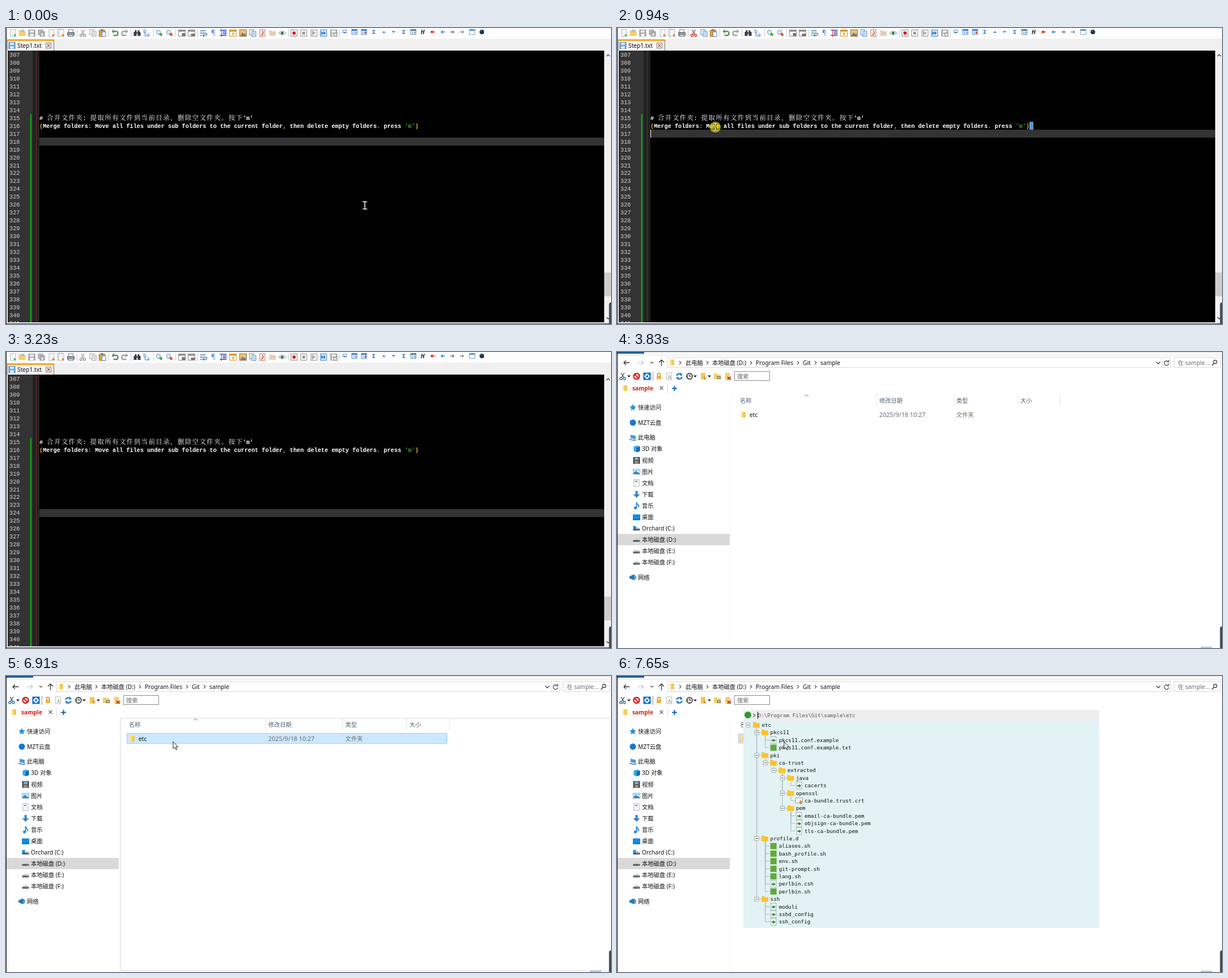
These frames come from a looping animation (1068 px wide and 524 px high, 8 s). An HTML page:

```html
<!DOCTYPE html>
<html lang="zh-CN">
<head>
<meta charset="utf-8">
<style>
html, body { margin: 0; width: 100%; height: 100%; overflow: hidden; background: #fff; }
svg { display: block; width: 100vw; height: 100vh; }
text { white-space: pre; }
.ui { font-family: "Noto Sans", "Noto Sans CJK SC", "Noto Sans CJK", sans-serif; }
.code { font-family: "Liberation Mono", "Noto Sans CJK SC", "Noto Sans CJK", monospace; }
.mono { font-family: "DejaVu Sans Mono", monospace; }
.han { font-family: "Noto Serif CJK SC", "Noto Sans CJK SC", "Noto Sans CJK", serif; letter-spacing: 1.36px; }
</style>
</head>
<body>
<svg id="stage" viewBox="0 0 1068 524" preserveAspectRatio="none"></svg>
<script>
const LOOP = 8000, CW = 6.14, LEFT = 59, END315 = 442, END316 = 728;

// Markup helpers
const R = (x, y, w, h, fill, stroke = 'none') =>
  `<rect x="${x}" y="${y}" width="${w}" height="${h}" fill="${fill}" stroke="${stroke}"/>`;
const P = (d, stroke, w = 1, fill = 'none') =>
  `<path d="${d}" fill="${fill}" stroke="${stroke}" stroke-width="${w}"/>`;
const F = (d, fill) => P(d, 'none', 0, fill);
const C = (x, y, r, fill, stroke = 'none', w = 1) =>
  `<circle cx="${x}" cy="${y}" r="${r}" fill="${fill}" stroke="${stroke}" stroke-width="${w}"/>`;
const T = (x, mid, s, fill = '#111', size = 10.25, cls = 'ui', more = '') =>
  `<text class="${cls}" x="${x}" y="${mid + size * .36}" font-size="${size}" fill="${fill}" ${more}>${s}</text>`;
const G = (id, body, more = '') => `<g id="${id}" ${more}>${body}</g>`;
const at = (x, y, body) => `<g transform="translate(${x} ${y})">${body}</g>`;
const lineMid = n => 201.3 + (n - 318) * 13.95;
const lineTop = n => Math.round(lineMid(n) - 7.2);

// Icons, drawn around 0,0
const page = (c = '#a9b2ba') => R(-4.5, -6, 9, 12, '#fff', c) + P('M-2.5 -2H2.5M-2.5 .5H2.5M-2.5 3H1', '#d3d9de', .8);
const badge = c => C(3.2, 4, 2.4, c, '#fff', .7);
const floppy = (c, hi = '#eee', edge = '#8c8c8c') => R(-5.5, -5.5, 11, 11, c, edge) + R(-3.5, -5, 7, 4, hi) + R(-3, 1.5, 6, 4, '#fff');
const folder = (c = '#f6cf62') => F('M-6 -5H-1L0 -3.5H6V5H-6Z', c);
const scissors = (c, d) => P('M-3 -6L2 2M3 -6L-2 2', c, 1.3) + C(-3, 4, 2, 'none', d, 1.4) + C(3, 4, 2, 'none', d, 1.4);
const copy = c => at(-2, -1.5, R(-3.5, -4.5, 7, 9, '#fff', c)) + at(2, 1.5, R(-3.5, -4.5, 7, 9, '#fff', c) + P('M-2 -2H2M-2 0H2M-2 2H2', c, .7));
const win = c => R(-6, -5.5, 12, 11, '#fff', c) + R(-6, -5.5, 12, 3, c);
const list = (c, d) => win(c) + P('M-4 0H0M-4 3H0', c) + R(1, -1, 4, 5, d);
const lens = c => C(-1.5, -1.5, 3.6, '#d6ebf8', '#7ba3bd', 1.1) + P('M1 1L5 5', '#b58a4a', 1.8) + C(2.8, 2.2, 2.5, c);
const pad = c => R(-5.5, -5.5, 11, 11, '#fbfbfb', '#8b8b8b') + c;
const arrow = (c, s) => `<g transform="scale(${s} 1)">${F('M5 -1H0V-4L-5 0L0 4V1H5Z', c)}</g>`;
const tri = (c, s) => F(`M-4 ${2 * s}H4L0 ${-2 * s}Z`, c);
const tris = c => F('M-4 -4H4L0 0L4 4H-4L0 0Z', c);
const turn = (c, s) => `<g transform="scale(${s} 1)">${P('M-5 -3H2Q5 -3 5 .5T2 4H-3', c, 2.4)}${F('M-2 -7V1L-6 -3Z', c)}</g>`;
const drive = F('M-6 1L-3 -2H4L6 1V3H-6Z', '#c9cdd0') + R(-6, 1, 12, 3, '#565b5f') + R(3, 2, 1.5, 1, '#7de07d');
const drop = x => at(x, 43, F('M-3 -1.5H3L0 2Z', '#222'));

function toolbar() {
  const blue = '#2f78cc', gray = '#8d8d8d';
  const top = [
    [12, page() + badge('#48b04a')], [28, folder() + R(-2, -6, 6, 4, '#9cc7ea')],
    [45, floppy('#b0b0b0')], [62, at(-1.5, -1.5, R(-4, -4, 8, 8, '#c4c4c4', gray)) + at(1.5, 1.5, R(-4, -4, 8, 8, '#b4b4b4', gray) + R(-2, 0, 4, 3, '#eee'))],
    [80, page() + badge('#e27b28')], [97, at(-2, -1, page()) + page() + badge('#e27b28')],
    [114, R(-4, -6, 8, 5, '#fff', '#777') + R(-6, -1, 12, 5, '#8fa2b4', '#566') + R(-4, 3, 8, 3, '#d9edf8', '#777')],
    [135, scissors('#999', '#999')], [153, copy('#999')],
    [170, R(-6, -5, 10, 11, '#e3a33c', '#9b6e23') + R(-3, -7, 4, 3, '#777') + R(-1, -2, 6.5, 8, '#fff', '#5b84b4')],
    [192, turn('#5c9457', 1)], [209, turn('#a2a2a2', -1)],
    [231, R(-6, -2, 5, 7, '#343c46') + R(1, -2, 5, 7, '#343c46') + R(-4, -5, 3, 4, '#343c46') + R(1, -5, 3, 4, '#343c46') + R(-2, -1, 4, 2, '#343c46')],
    [248, T(-6, -3, 'b', '#2166bb', 9) + T(0, 3, 'a', '#2166bb', 9) + P('M-3 -1V5H0', blue)],
    [270, lens('#52aa46')], [288, lens('#db5145')],
    [310, win(gray) + R(0, 0, 6, 5, '#777')], [327, win(gray) + R(-1, 1, 7, 4, '#777')],
    [348, P('M-6 -4H4M-6 0H3Q6 0 6 2T3 4H0M-6 4H-3', '#4a7dac', 1.4) + F('M1 1V7L-2 4Z', blue)],
    [365, T(-3.5, 0, '¶', '#5b93e0', 12)],
    [383, P('M-6 -5H6M-1 -2H6M-1 1H6M-6 4H6', '#2a36b7', 1.7) + P('M-3 -6V7', '#d33', 1)],
    [400, win('#d59626') + F('M3 -2L-3 1H0L-2 5L4 1H1Z', '#e8a020')],
    [418, R(-6, -6, 12, 12, '#efc373', '#967140') + F('M-5 5L-1 -1L2 2L4 0L5 5Z', '#577f9b')],
    [435, copy('#4783bd')], [452, page('#c96854') + P('M-2 4Q4 1 0 -4', '#d8432b', 1.7)],
    [470, folder('#e8d3bd') + P('M-3 0H4', '#c9b09a', 1)],
    [487, P('M-6.5 0Q0 -7.5 6.5 0Q0 6.5 -6.5 0Z', '#9dbccb', 1.2, '#f2f8fb') + C(0, 0, 2.8, '#6ea261') + C(0, 0, 1.3, '#223')],
    [508, pad(C(0, 0, 3, '#d32018'))], [525, pad(R(-2.5, -2.5, 5, 5, '#999'))],
    [543, pad(F('M-2 -4L3 0L-2 4Z', '#aaa') + P('M-3 -4V4', '#888'))],
    [560, R(-5.5, -5.5, 11, 11, '#edf6ff', blue) + F('M-4 -4L0 0L-4 4ZM0 -4L4 0L0 4Z', blue)],
    [578, floppy('#bbb') + R(0, 0, 6, 6, '#ddd', '#888')]
  ].map(([x, b]) => at(x + .5, 9, b)).join('');
  const small = [
    [598, R(-4, -4, 8, 6, '#eaf4ff', blue) + F('M-2 0H2L0 4Z', blue)], [615, list(blue, '#8bbce9')], [632, list(blue, '#d95a43')],
    [649, tris(blue)], [667, tri(blue, 1)], [684, tri(blue, -1)], [702, tris(blue)], [719, list('#4e7596', '#8bbce9')],
    [753, arrow('#e01818', 1)], [771, arrow('#3d8be0', 1)], [788, arrow('#888', -1)], [805, arrow('#999', -1)],
    [823, win('#5590c6')], [840, C(0, 0, 5, '#17314f') + C(-1, -2, 1.5, '#527ba2')]
  ].map(([x, b]) => at(x, 7, `<g transform="scale(.8)">${b}</g>`)).join('');
  const seps = [125, 181, 220, 260, 299, 338, 498, 588].map(x => R(x, 2, 1, 14, '#c9c9c9')).join('');
  const active = G('active', [[135, scissors('#555', '#d0362c')], [153, copy('#4684c4')]]
    .map(([x, b]) => R(x - 7, 1, 15, 16, '#fdfdfd') + at(x + .5, 9, b)).join(''));
  return top + small + seps + T(732, 7, 'H', '#222', 10, 'ui', 'font-style="italic" font-weight="600"') + active;
}

function codeLine(y, parts) {
  let x = LEFT;
  return parts.map(([s, fill = '#fff']) => {
    const han = s.charCodeAt(0) > 255;
    const out = han ? T(x + .7, y, s, fill, 11.5, 'han', 'font-weight="500"')
      : T(x, y, s, fill, 10.235, 'code', 'font-weight="700"');
    x += s.length * (han ? 12.86 : CW);
    return out;
  }).join('');
}

function editor() {
  const op = '#e2b93c', str = '#2fae20';
  let nums = '';
  for (let n = 307; n <= 341; n++) nums += T(6, lineMid(n) - .3, n, '#d4d4d4', 10.235, 'code');
  return R(0, 0, 1068, 524, '#f0f0f0') + R(0, 0, 1068, 19, '#fdfdfd') + toolbar() +
    R(3, 20, 81, 20, '#f4f4f4') + R(3, 20, 81, 3, '#f6a62a') + P('M84.5 21V40M2.5 20V40', '#777') +
    at(10.5, 31, floppy('#6ea6da', '#d8ebf8', '#5586b4')) + T(20, 31, 'Step1.txt') +
    R(70.5, 26.5, 9, 9, '#fff', '#94735c') + P('M72.5 28.5L77.5 33.5M77.5 28.5L72.5 33.5', '#8b5b3d', 1.4) +
    R(3, 40, 1053, 481, '#000') + R(3, 40, 44, 481, '#333') + R(47, 40, 12, 481, '#222') +
    R(53, 40, 1, 481, '#7c2328') + nums + R(42.5, 152, 2.5, 369, '#13a01b') +
    R(1056, 433, 12, 42, '#cdcdcd') + P('M1060 50L1063 47L1066 50M1060 512L1063 515L1066 512', '#444', 1.3) +
    R(LEFT, 0, 997, 14, '#333').replace('<rect', '<rect id="current"') +
    P('', 'none', 0, '#6297d4').replace('<path', '<path id="marked"') +
    codeLine(159.3, [['# '], ['合并文件夹'], [': '], ['提取所有文件到当前目录，删除空文件夹。按下'], ["'m'"]]) +
    codeLine(173.3, [['(', op], ['Merge folders'], [':', op], [' Move all files under sub folders to the current folder'], [',', op],
      [' then delete empty folders'], ['.', '#bbb'], [' press '], ["'m'", str], [')', op]]) +
    R(LEFT, 0, 1, 14, '#fff').replace('<rect', '<rect id="caret"') +
    R(0, 521, 1068, 2, '#ececec') + R(0, 523, 1068, 1, '#3a3a3a') + R(0, 0, 1, 524, '#111');
}

function sidebar() {
  const sky = '#1f8fe0', pic = b => R(-6, -4.5, 12, 9, '#f3f8fc', '#9ab') + b;
  const rows = [
    [98, '快速访问', F('M0 -6L1.7 -2L6 -1.5L2.7 1.3L3.7 5.5L0 3.2L-3.7 5.5L-2.7 1.3L-6 -1.5L-1.7 -2Z', sky)],
    [125, 'MZT云盘', C(0, 0, 5.5, '#1676d2')],
    [151.5, '此电脑', F('M-4 -5L5 -3V3L-4 1Z', '#3c9be5') + P('M-6 3L2 5L6 4', '#889', 2)],
    [171.5, '3D 对象', F('M-5 -4L1 -6L6 -4V4L0 6L-5 4Z', '#35a9e8') + F('M0 -2L6 -4V4L0 6Z', '#1768b5')],
    [192, '视频', R(-6, -6, 12, 12, '#454b51') + R(-3.5, -5, 7, 4.5, '#7aaed0') + R(-3.5, 1, 7, 4.5, '#b38a5f')],
    [212, '图片', pic(F('M-5 4V1L-1 -1L5 2V4Z', '#3687bd') + R(-5, -3, 10, 2, '#8cd0f4'))],
    [232, '文档', page() + R(-2.5, -4, 4, 2, '#4c95ce')],
    [252, '下载', F('M-2 -6H2V0H6L0 6L-6 0H-2Z', '#3384cc')],
    [272, '音乐', C(-2, 4, 2.5, '#1d83da') + P('M0 4V-6Q1 -2 4 0Q4 2 3 3', '#1d83da', 1.7)],
    [292, '桌面', R(-6.5, -4.5, 13, 10, '#148be0') + R(-6.5, 4, 13, 1.5, '#0866ac')],
    [312, 'Orchard (C:)', drive + R(-6, -4, 5, 5, '#1593e6')],
    [332, '本地磁盘 (D:)', drive], [352.5, '本地磁盘 (E:)', drive], [372.5, '本地磁盘 (F:)', drive],
    [399, '网络', C(1, 0, 5, '#4d9dd4') + F('M-6 -2L2 -4V3L-6 2Z', '#2e75af')]
  ];
  return R(1, 322, 198, 20, '#d9d9d9') + rows.map(([y, s, icon]) => {
    const deep = y > 160 && y < 390;
    return at(deep ? 34.5 : 28, y, icon) + T(deep ? 44 : 37, y, s);
  }).join('');
}

function explorer() {
  const ink = '#4f6277', chev = x => P(`M${x} 16L${x + 3} 19L${x} 22`, '#555', 1.2);
  const crumbs = [[121, '此电脑'], [168, '本地磁盘 (D:)'], [245, 'Program Files'], [328, 'Git'], [359, 'sample']];
  const small = (x, y) => at(x, y, R(-4, -5, 8, 10, '#f3c951') + R(-4, -5, 3, 10, '#ffe294'));
  const tools = [
    [10, scissors('#444', '#1d71bc')], [34.5, C(0, 0, 5, '#fff', '#d51c19', 2.4) + P('M-3 -3L3 3', '#d51c19', 2.4)],
    [53, R(-6.5, -6.5, 13, 13, '#0d6fcd') + C(0, 0, 3, 'none', '#fff', 2) + P('M0 -5V-3M0 3V5M-5 0H-3M3 0H5', '#fff', 1.6)],
    [74, P('M-2.5 -1V-4Q0 -7 2.5 -4V-1', '#b6812c', 1.4) + R(-4, -1, 8, 6, '#efb343')],
    [92, page('#bbb') + T(-2, 2, 'A', '#999', 9)],
    [110, P('M-5 -1Q-3 -6 3 -4M5 1Q3 6 -3 4', '#2679c8', 2.2) + F('M2 -7L6 -2L1 -1ZM-2 7L-6 2L-1 1Z', '#2679c8')],
    [128, C(0, 0, 5, '#eee', '#444', 1.8) + P('M0 -3V0H3', '#333', 1.2) + F('M-7 -1H-2L-4 3Z', '#3a7b41')],
    [152, R(-4, -6, 8, 12, '#f4c75c') + F('M1 -1L6 4L2 6Z', '#db9139')],
    [177, folder('#f1ce70') + R(0, 0, 6, 5, '#706947') + P('M1 2.5H5M3 .5V4.5', '#fff')],
    [195, R(-4, -6, 8, 12, '#f4d06d') + P('M0 1L6 6M6 1L0 6', '#d82916', 1.9)]
  ].map(([x, b]) => at(x, 43, b)).join('');
  return R(0, 0, 1068, 524, '#fff') + R(48, 0, 1020, 1, '#ddd') + R(1, 0, 47, 3, '#235a9f') + R(1, 5, 1067, 1, '#e3e3e3') +
    P('M22 19H12M16 15L12 19L16 23', '#333', 1.3) + P('M37 19H47M43 15L47 19L43 23', '#ccc', 1.3) +
    P('M59 17.5L61.5 20L64 17.5', '#555', 1.2) + P('M78.5 25V14M74 18.5L78.5 14L83 18.5', '#333', 1.3) +
    R(89.5, 9.5, 888, 18, '#fff', '#d9d9d9') + R(962, 10, 1, 17, '#ddd') + small(97, 18.5) +
    [110, 158, 235, 318, 349].map(chev).join('') + crumbs.map(([x, s]) => T(x, 19, s)).join('') +
    P('M952 17.5L955.5 21L959 17.5', '#444', 1.4) + P('M973 17A4 4 0 1 0 974 20M974 14V17.5H970.5', '#444', 1.2) +
    R(983.5, 9.5, 82, 18, '#fff', '#d9d9d9') + T(990, 19, '在 sample...', '#6d6d6d') +
    C(1056, 17.5, 3, 'none', '#444', 1.3) + P('M1054 20L1050 24', '#444', 1.6) +
    tools + [21, 138, 163].map(drop).join('') + R(63, 35, 1, 16, '#999') +
    R(207.5, 34.5, 62, 16, '#fff', '#8c8c8c') + T(212, 43, '搜索', '#666') +
    small(14, 64) + T(27, 64, 'sample', '#d5200d', 10.25, 'ui', 'font-weight="700"') +
    P('M75.5 61L81.5 67M81.5 61L75.5 67', '#666', 1.2) + R(89, 55, 1, 18, '#ddd') + P('M97 64.5H106M101.5 60V69', '#0b62bd', 2) +
    sidebar() + R(200, 75, 1, 449, '#f0f0f0') +
    R(202.5, 74.5, 870, 447, 'none', '#d9dcdf').replace('<rect', '<rect id="frame"') +
    P('M331 78.5L334.5 75.5L338 78.5', '#777', 1) + [458, 594, 707, 782].map(x => R(x, 74, 1, 23, '#e5e5e5')).join('') +
    [[217, '名称'], [463, '修改日期'], [599, '类型'], [712, '大小']].map(([x, s]) => T(x, 86, s, ink)).join('') +
    R(213.5, 101.5, 565, 18, 'none').replace('<rect', '<rect id="row"') +
    small(223, 111) + T(234, 111, 'etc') + T(463, 111, '2025/9/18 10:27', '#6d6d6d', 10.8) + T(599, 111, '文件夹', '#6d6d6d') +
    R(1031.5, 522.5, 18, 6, '#e5f3ff', '#58a5dc') + R(0, 0, 1, 524, '#111') + G('popup', popup());
}

function popup() {
  const names = `etc/
 pkcs11/
  pkcs11.conf.example
  pkcs11.conf.example.txt
 pki/
  ca-trust/
   extracted/
    java/
     cacerts
    openssl/
     ca-bundle.trust.crt
    pem/
     email-ca-bundle.pem
     objsign-ca-bundle.pem
     tls-ca-bundle.pem
 profile.d/
  aliases.sh
  bash_profile.sh
  env.sh
  git-prompt.sh
  lang.sh
  perlbin.csh
  perlbin.sh
 ssh/
  moduli
  sshd_config
  ssh_config`.split('\n');
  const parentY = [];
  let lines = '', items = '';
  names.forEach((raw, i) => {
    const name = raw.trim(), level = raw.length - name.length, dir = name.endsWith('/');
    const x = 255.5 + 15.1 * level, y = 86.7 + 13.4 * i, vx = x - 24;
    if (level) lines += P(`M${vx} ${parentY[level - 1] + 6}V${y}H${x - 16}`, '#a9b4b6', .9);
    parentY[level] = y;
    let icon;
    if (dir) {
      icon = folder('#fcc42c');
      items += R(vx - 3.5, y - 3.5, 7, 7, '#fff', '#a0a7a9') + P(`M${vx - 2} ${y}H${vx + 2}`, '#444');
    } else if (/\.(sh|txt)$/.test(name)) icon = R(-5.5, -5.5, 11, 11, '#63a83a');
    else if (/\.crt$/.test(name)) icon = R(-6, -5, 12, 9, '#f8f4e9', '#a6a6a6') + C(3, 2, 2.4, '#d49a32') + P('M2 4V6M4 4V6', '#b76c22', 1.4);
    else icon = R(-4.5, -6, 9, 12, '#fff', '#a4a9aa') + F('M-3 -.8H0V-3L3.5 .5L0 4V1.8H-3Z', '#238f38');
    items += at(x - 9.5, y, icon) + T(x, y, dir ? name.slice(0, -1) : name, '#111', 9.24, 'mono');
  });
  return R(223, 60.5, 628, 385.5, '#e2f2f5') + R(223, 60.5, 628, 18.5, '#eeeeee') + C(231, 69, 6, '#359a2d') +
    P('M240 66.5L244 69.5L240 72.5', '#555', 1.1) + T(248.5, 69.7, 'D:\\Program Files\\Git\\sample\\etc', '#555', 9.24, 'mono') +
    G('tree', lines + items) + R(248, 63, 1, 13, '#111').replace('<rect', '<rect id="prompt"');
}

const beam = (c, w) => P('M-4 -6.5H-1L0 -5.5L1 -6.5H4M0 -5.5V5.5M-4 6.5H-1L0 5.5L1 6.5H4', c, w);
document.getElementById('stage').innerHTML =
  G('editor', editor()) + G('explorer', explorer()) +
  F('M1068 486H1067Q1064.5 486 1064.5 490V524H1068Z', '#41494d') +
  G('pointer', C(0, 0, 9.7, '#f7e000').replace('<circle', '<circle id="press" opacity=".66"') +
    G('beam', beam('#000', 2.6) + beam('#fff', 1.5)) +
    G('arrow', P('M0 0V12.2L2.9 9.6L4.9 14.2L7 13.3L5 8.8H8.8Z', '#222', 1, '#fff') +
      G('busy', C(12.5, .5, 4.8, 'none', '#53b4e8', 2.6) + P('M12.5 -4.3A4.8 4.8 0 0 1 17.3 .5', '#1777c4', 2.6))));

const el = {};
document.querySelectorAll('[id]').forEach(e => el[e.id] = e);
const show = (e, on) => e.setAttribute('visibility', on ? 'inherit' : 'hidden');
const set = (e, o) => Object.entries(o).forEach(([k, v]) => e.setAttribute(k, v));

// Screen updates: first, last, count
const updates = [[70, 870, 13], [940, 1300, 6], [1440, 1750, 6], [2010, 2010, 1], [2610, 2610, 1], [2750, 2750, 1],
  [2960, 3230, 5], [3830, 3830, 1], [4030, 4640, 10], [4840, 4900, 2], [6570, 6570, 1], [6710, 6910, 4], [7380, 7650, 4]];
function snap(t) {
  let last = 0;
  for (const [a, b, n] of updates) {
    if (t < a) break;
    const d = (b - a) / (n - 1 || 1);
    last = t >= b ? b : a + Math.floor((t - a) / d) * d;
  }
  return last;
}

const path = [[10, 633.5, 314], [540, 745, 176], [610, 745, 176], [690, 600, 185], [870, 235, 183], [940, 173.5, 175.3], [1300, 2, 157],
  [1380, 2, 157], [1750, 424.5, 284], [2900, 424.5, 284], [3230, 398, 530], [3960, 115, 530], [4300, 155, 330], [4640, 295, 116.5]];
function place(t) {
  const i = path.findIndex(k => k[0] > t);
  if (i < 0) return path[path.length - 1].slice(1);
  if (!i) return path[0].slice(1);
  const [a, x, y] = path[i - 1], [b, u, v] = path[i], k = (t - a) / (b - a);
  return [x + (u - x) * k, y + (v - y) * k];
}

const block = (x, end, n) => `M${x} ${lineTop(n)}H${end}v14H${x}Z`;
// The selection trails the pointer by one update
function select(t) {
  if (t < 610) return { line: 318, x: LEFT, d: '' };
  if (t >= 2610) return { line: 324, x: LEFT, d: '' };
  const [px, py] = place(Math.min(t, 1300) - 68);
  const line = py > 180 ? 317 : py > 166 ? 316 : 315;
  const end = line === 315 ? 435 : line === 316 ? END316 : LEFT;
  const x = LEFT + Math.round((Math.max(LEFT, Math.min(end, px)) - LEFT) / CW) * CW;
  const d = line === 317 ? block(END316, END316 + 7, 316)
    : line === 316 ? block(x, END316, 316)
    : block(x, END315, 315) + block(LEFT, END316, 316);
  return { line, x, d };
}

function draw(now) {
  const t = snap(now), files = t >= 3830, within = (a, b) => t >= a && t < b;
  show(el.editor, !files);
  show(el.explorer, files);

  const s = select(t), y = lineTop(s.line);
  el.current.setAttribute('y', y);
  el.marked.setAttribute('d', s.d);
  set(el.caret, { x: s.x, y });
  show(el.caret, !files && (within(610, 1490) || within(2010, 3160)));
  show(el.active, !files && within(670, 2610));

  show(el.frame, within(4430, 7380));
  const blur = t >= 7380, chosen = t >= 4840, hover = t >= 4640;
  set(el.row, {
    fill: blur ? '#d9d9d9' : chosen ? '#cce8ff' : hover ? '#e5f3ff' : 'none',
    stroke: chosen && !blur ? '#99d1ff' : 'none'
  });
  show(el.popup, t >= 7380);
  show(el.tree, t >= 7465);
  show(el.prompt, t >= 7645);
  if (!blur) [el.tree, el.prompt].forEach(e => show(e, false));

  const [px, py] = place(t), seen = !within(3230, 4030);
  el.pointer.setAttribute('transform', `translate(${px} ${py})`);
  show(el.beam, seen && !files);
  show(el.arrow, seen && files);
  show(el.press, within(610, 1440) || within(2610, 2750) || within(4840, 4900));
  show(el.busy, within(6570, 6910));
  el.busy.setAttribute('transform', `rotate(${(t - 6570) * .9} 12.5 .5)`);
}

const start = performance.now();
function tick() {
  draw((performance.now() - start) % LOOP);
  requestAnimationFrame(tick);
}
tick();
</script>
</body>
</html>
```
